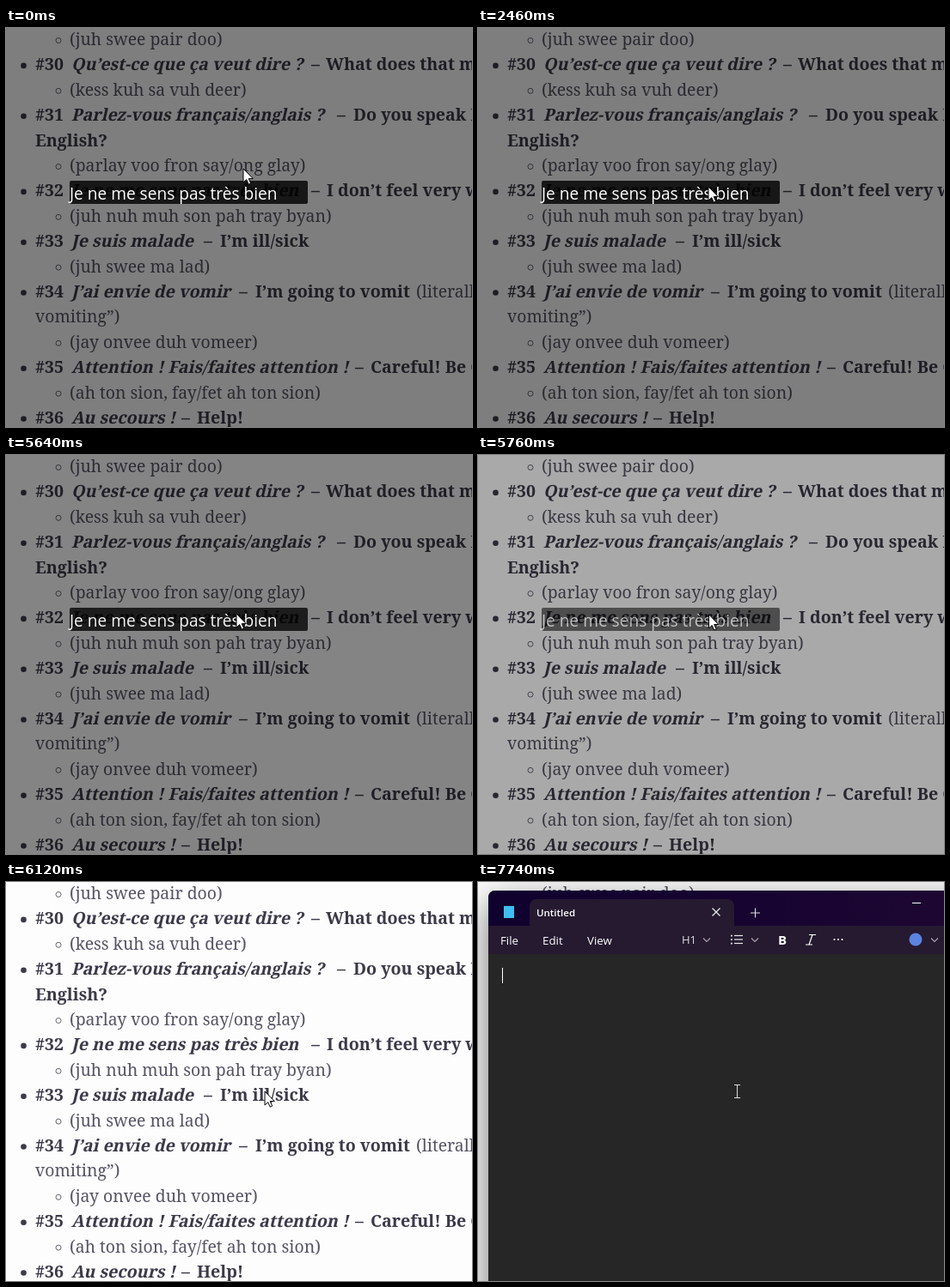
An HTML page with a canvas for the animation above (8 s loop, 542x465 px).

```html
<!DOCTYPE html>
<html lang="en">
<head>
<meta charset="utf-8">
<title>Phrase list</title>
<style>
html, body { margin: 0; width: 100%; height: 100%; overflow: hidden; background: #fdfdfd; }
canvas { display: block; }
</style>
</head>
<body>
<canvas id="stage" width="542" height="465"></canvas>
<script>
const ctx = document.getElementById('stage').getContext('2d');
const W = 542, H = 465, LOOP = 8000, STEP = 60;
const SLAB = '"Noto Serif", serif', SANS = '"Open Sans", "Noto Sans", sans-serif';
const LIGHT = `300 19.4px ${SLAB}`, BOLD = `700 19.6px ${SLAB}`;

// Rows: a string is a pronunciation; an array is [number, phrase, dash x, meaning, meaning x]
const rows = [
  '(juh swee pair doo)',
  ['#30', 'Qu’est-ce que ça veut dire ?', 355, 'What does that mean?', 372],
  '(kess kuh sa vuh deer)',
  ['#31', 'Parlez-vous français/anglais ?', 385, 'Do you speak French/', 404],
  { text: 'English?', font: BOLD, color: '#3c3a49' },
  '(parlay voo fron say/ong glay)',
  ['#32', 'Je ne me sens pas très bien', 355, 'I don’t feel very well', 373],
  '(juh nuh muh son pah tray byan)',
  ['#33', 'Je suis malade', 230, 'I’m ill/sick', 249],
  '(juh swee ma lad)',
  ['#34', 'J’ai envie de vomir', 271, 'I’m going to vomit', 290, '(literally', 477],
  { text: 'vomiting”)', font: LIGHT, color: '#565464' },
  '(jay onvee duh vomeer)',
  ['#35', 'Attention ! Fais/faites attention !', 406, 'Careful! Be Careful!', 424],
  '(ah ton sion, fay/fet ah ton sion)',
  ['#36', 'Au secours !', 204, 'Help!', 222]
];
const toggles = [480, 780, 1200, 1560, 1980, 2460, 3240, 3720];

const clamp = v => Math.max(0, Math.min(1, v));
const mix = (a, b, p) => a + (b - a) * p;
const smooth = p => p * p * (3 - 2 * p);
const mixColor = (a, b, p) => `rgb(${a.map((v, i) => Math.round(mix(v, b[i], p)))})`;

function text(str, x, y, font, color) {
  ctx.font = font;
  ctx.fillStyle = color;
  ctx.fillText(str, x, y);
}

function rect(x, y, w, h, color, radius = 0) {
  ctx.fillStyle = color;
  ctx.beginPath();
  ctx.roundRect(x, y, w, h, radius);
  ctx.fill();
}

function line(color, width, ...paths) {
  ctx.strokeStyle = color;
  ctx.lineWidth = width;
  ctx.beginPath();
  for (const [x, y, ...rest] of paths) {
    ctx.moveTo(x, y);
    for (let i = 0; i < rest.length; i += 2) ctx.lineTo(rest[i], rest[i + 1]);
  }
  ctx.stroke();
}

function dot(x, y, r, color) {
  ctx.fillStyle = color;
  ctx.beginPath();
  ctx.arc(x, y, r, 0, 7);
  ctx.fill();
}

function drawPage() {
  rect(0, 0, W, H, '#fdfdfd');
  rows.forEach((row, i) => {
    const y = 20 + 29.4 * i, ink = '#3c3a49', soft = '#565464';
    if (typeof row === 'string') {
      ctx.strokeStyle = soft;
      ctx.lineWidth = 0.9;
      ctx.beginPath();
      ctx.arc(61, y - 5.5, 3, 0, 7);
      ctx.stroke();
      text(row, 74, y, LIGHT, soft);
    } else if (row.text) {
      text(row.text, 34, y, row.font, row.color);
    } else {
      const [number, phrase, dashX, meaning, meaningX, note, noteX] = row;
      dot(20.5, y - 5.5, 3.3, ink);
      text(number, 34, y, BOLD, ink);
      ctx.save();
      ctx.transform(1, 0, -0.23, 1, 76, y);
      text(phrase, 0, 0, BOLD, ink);
      ctx.restore();
      text('–', dashX, y, BOLD, ink);
      text(meaning, meaningX, y, BOLD, ink);
      if (note) text(note, noteX, y, LIGHT, soft);
    }
  });
}

function drawOverlay(t) {
  const shown = 1 - smooth(clamp((t - 5580) / 460));
  if (!shown) return;
  const english = toggles.filter(at => at <= t).length % 2;
  ctx.globalAlpha = shown;
  rect(0, 0, W, H, 'rgba(0,0,0,.5)');
  rect(74, 178, 277, 27, 'rgba(0,0,0,.82)', 2);
  text(english ? "I don't feel very well." : 'Je ne me sens pas très bien', 74, 200, `400 19.1px ${SANS}`, '#fff');
  ctx.globalAlpha = 1;
}

function drawArrow(t) {
  const enter = clamp(t / 180), leave = clamp((t - 5640) / 480) ** 3;
  const x = mix(mix(276, 268, enter), 301, leave);
  const y = mix(mix(164, 185, enter), 244, leave);
  ctx.save();
  ctx.translate(x, y);
  const shape = new Path2D('M0 0V16L3.7 12.6L6.2 18.2L8.7 17.1L6.2 11.6H11.3Z');
  ctx.fillStyle = '#fff';
  ctx.fill(shape);
  ctx.strokeStyle = '#000';
  ctx.lineWidth = 1;
  ctx.stroke(shape);
  ctx.restore();
}

function chevron(x, y) {
  line('#aaa5b0', 1.1, [x - 4, y - 2, x, y + 2, x + 4, y - 2]);
}

function drawToolbar() {
  const menuFont = `400 13.3px ${SANS}`;
  text('File', 26, 73, menuFont, '#fff');
  text('Edit', 75, 73, menuFont, '#fff');
  text('View', 127, 73, menuFont, '#fff');
  text('H1', 237, 72, `400 13px ${SANS}`, '#e0dde4');
  [266, 322, 531].forEach(x => chevron(x, 67.5));
  for (const y of [62.5, 67, 71.5]) {
    rect(294, y - 0.8, 1.8, 1.8, '#e8e8e8');
    line('#e8e8e8', 1.2, [298, y, 308, y]);
  }
  text('B', 349, 73, `700 15px ${SANS}`, '#fff');
  line('#fff', 1.2, [385, 61.5, 393, 61.5], [381, 73, 389, 73], [389, 61.5, 385, 73]);
  [414.5, 419, 423.5].forEach(x => dot(x, 67, 1.1, '#fff'));
  dot(509, 67, 7.5, '#5b84e0');
}

function drawEditor(t) {
  const p = clamp((t - 6720) / 600), rest = (1 - p) ** 3.4;
  const scale = 1 - 0.162 * rest;
  const tint = clamp((t - 6780) / 300);
  ctx.save();
  ctx.globalAlpha = t < 6780 ? 0.5 : 1;
  // The window grows about its own centre, which lies below the stage
  ctx.translate(451, 773);
  ctx.scale(scale, scale);
  ctx.translate(-451, -773);

  ctx.shadowColor = 'rgba(0,0,0,.55)';
  ctx.shadowBlur = 44;
  ctx.shadowOffsetY = 14;
  rect(12, 10, 878, 1526, '#262626', 8);
  ctx.shadowColor = 'transparent';

  const bar = ctx.createLinearGradient(12, 0, W, 0);
  bar.addColorStop(0, mixColor([25, 19, 32], [15, 1, 46], tint));
  bar.addColorStop(1, mixColor([26, 19, 34], [29, 6, 50], tint));
  const tab = mixColor([33, 28, 39], [37, 26, 48], tint);
  rect(12, 10, 878, 42, bar, [8, 8, 0, 0]);
  rect(60, 20, 238, 32, tab, [8, 8, 0, 0]);
  rect(12, 51, 878, 33, tab);

  rect(30, 28, 12, 14, '#3fbdf0');
  text('Untitled', 68, 40, `600 11.5px ${SANS}`, '#fff');
  line('#eee', 1.2, [272.5, 30.5, 281.5, 39.5], [281.5, 30.5, 272.5, 39.5]);
  line('#ddd', 1.1, [317, 36, 328, 36], [322.5, 30.5, 322.5, 41.5]);
  line('#fff', 1.1, [505, 24.5, 515, 24.5], [549, 20, 559, 20, 559, 30, 549, 30, 549, 20]);
  drawToolbar();
  if (t < 7210 || t >= 7740) rect(28, 100, 1, 18, '#fff');
  ctx.restore();

  if (t >= 6840) line('#ddd', 1, [298, 236.5, 305, 236.5], [298, 251.5, 305, 251.5], [301.5, 237, 301.5, 251]);
}

function draw(now) {
  const t = Math.floor(now % LOOP / STEP) * STEP;
  drawPage();
  drawOverlay(t);
  if (t < 6720) drawArrow(t);
  else drawEditor(t);
  requestAnimationFrame(() => draw(performance.now() - start));
}

const start = performance.now();
draw(0);
</script>
</body>
</html>
```
